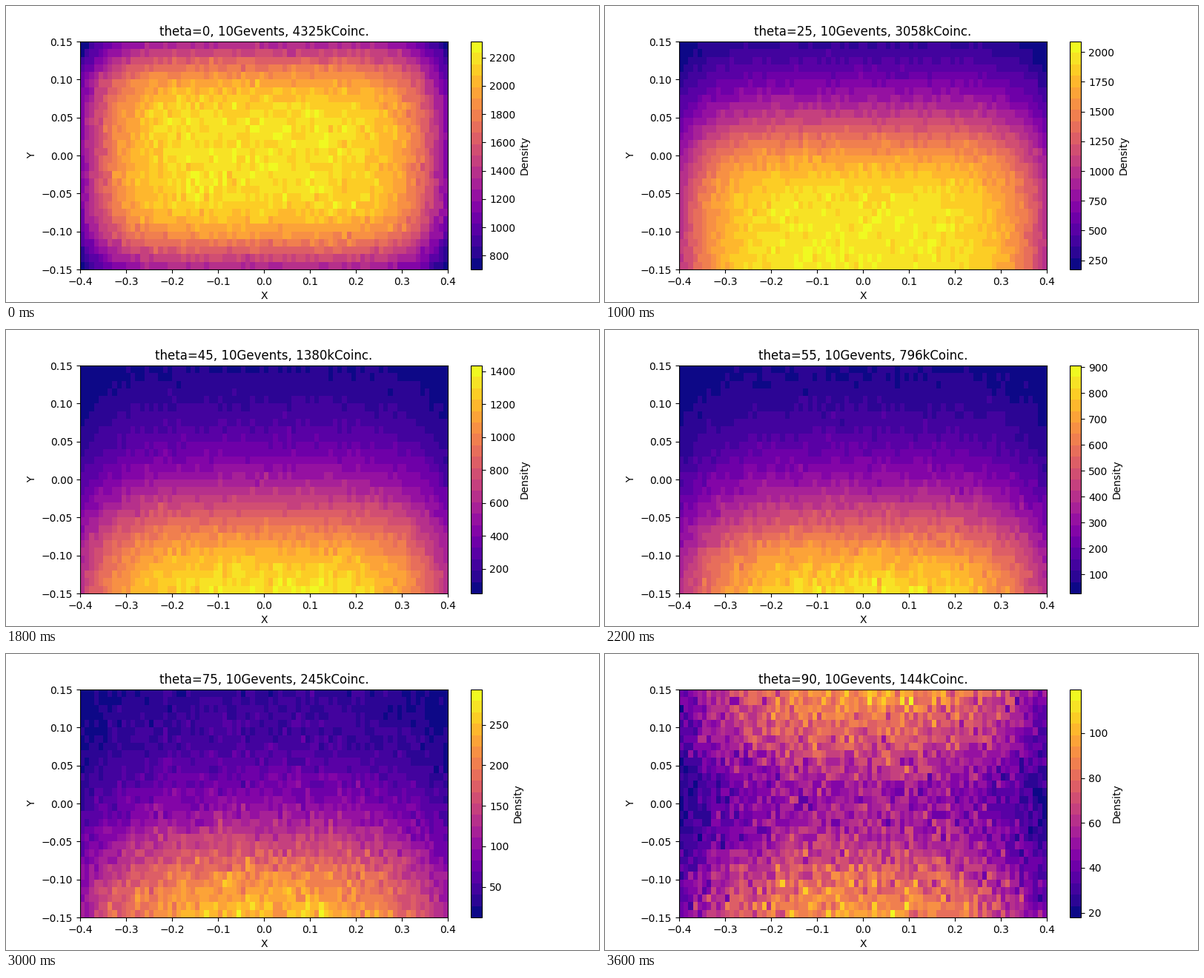
Animation, 800 px wide and 400 px high, one loop 3.8 s. Source, as a matplotlib script:

```python
import numpy as np
import matplotlib.pyplot as plt
from matplotlib.animation import FuncAnimation

NX, NY = 80, 30
HALF_X, HALF_Y = 0.4, 0.15
STEP = 5  # degrees per frame

# Key points of the coincidence count, in thousands.
ANGLES = np.array([0, 15, 35, 45, 65, 75, 85, 90])
KCOINC = np.array([4325, 3767, 2207, 1380, 441, 245, 102, 144])


def count(theta):
    """Cubic Hermite curve through the logarithms of the key points."""
    logs = np.log(KCOINC)
    slopes = np.gradient(logs, ANGLES)
    slopes[0] = 0
    i = min(np.searchsorted(ANGLES, theta, side="right"), len(ANGLES) - 1) - 1
    h = ANGLES[i + 1] - ANGLES[i]
    t = (theta - ANGLES[i]) / h
    ease = t * t * (3 - 2 * t)
    bend = t * (1 - t) * h * ((1 - t) * slopes[i] - t * slopes[i + 1])
    return np.exp(logs[i] + ease * (logs[i + 1] - logs[i]) + bend)


def hump(y, center, width):
    return 1 / (1 + ((y - center) / width) ** 4)


def mean_density(theta, total):
    """Expected events per cell: a hump sliding down as the plane tilts."""
    tilt = min(1, theta / 48)
    mirror = np.exp(-((90 - theta) / 7.5) ** 1.4)
    center = -0.25 * tilt
    width = 0.165 + 0.05 * tilt - 0.015 * mirror
    along = hump(y_mid, center, width) + mirror * hump(y_mid, -center, width)

    drop = 0.49 + 0.08 * theta / 90
    power = 5 - 2.5 * np.sin(np.radians(theta)) ** 3
    across = 1 - drop * np.abs(x_mid / HALF_X) ** power

    mean = np.outer(along, across)
    return mean * total / mean.sum()


x_edges = np.linspace(-HALF_X, HALF_X, NX + 1)
y_edges = np.linspace(-HALF_Y, HALF_Y, NY + 1)
x_mid = (x_edges[1:] + x_edges[:-1]) / 2
y_mid = (y_edges[1:] + y_edges[:-1]) / 2

fig, ax = plt.subplots(figsize=(8, 4), dpi=100)
mesh = ax.pcolormesh(x_edges, y_edges, np.zeros((NY, NX)),
                     cmap=plt.get_cmap("plasma", 20), vmin=0, vmax=1)
ax.set_xlabel("X")
ax.set_ylabel("Y")
title = ax.set_title("")
bar = fig.colorbar(mesh, ax=ax)
bar.set_label("Density")


def update(frame):
    theta = frame * STEP
    kcoinc = count(theta)
    mean = mean_density(theta, kcoinc * 1000)
    low, high = mean.min(), mean.max()
    mesh.set_array(np.random.default_rng(100 + theta).poisson(mean))
    # Colour limits sit where the extreme counts are expected.
    mesh.set_clim(low - 1.3 * np.sqrt(low), high + 2.8 * np.sqrt(high))
    title.set_text(f"theta={theta}, 10Gevents, {kcoinc:.0f}kCoinc.")
    return mesh, title


anim = FuncAnimation(fig, update, frames=19, interval=200,
                     repeat=True, blit=False)
plt.show()
```
